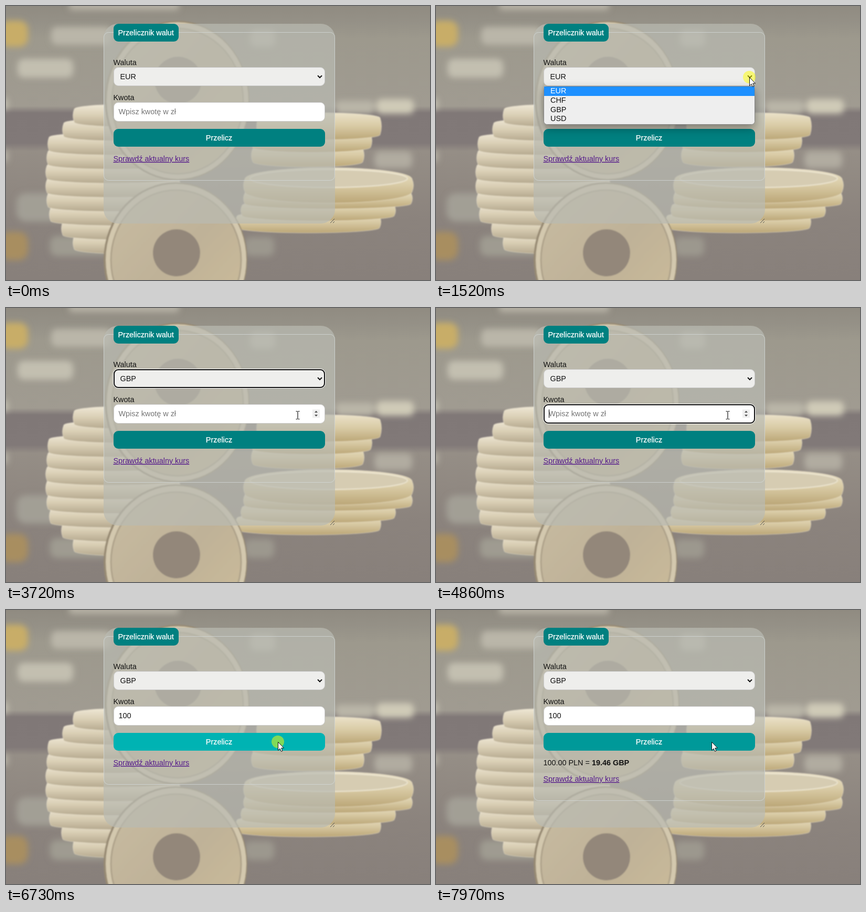
These frames come from a looping animation (808 by 524 pixels, 8 s). An HTML page:

```html
<!DOCTYPE html>
<html lang="pl">
<head>
<meta charset="utf-8">
<title>Przelicznik walut</title>
<style>
  html, body { margin: 0; width: 100%; height: 100%; overflow: hidden; background: #928d85; }
  svg { display: block; width: 808px; height: 524px; }
  text { font: 14.4px "Liberation Sans", Arial, sans-serif; fill: #111; white-space: pre; }
  .light { fill: #fff; stroke: #fff; stroke-width: .25; }
  .ring { fill: none; }
</style>
</head>
<body>
<svg viewBox="0 0 808 524" xmlns="http://www.w3.org/2000/svg">
  <defs>
    <linearGradient id="wall" x1="0" y1="0" x2="0" y2="1">
      <stop offset="0" stop-color="#908b81"/>
      <stop offset=".06" stop-color="#959187"/>
      <stop offset=".12" stop-color="#9d998d"/>
      <stop offset=".365" stop-color="#a09b91"/>
      <stop offset=".39" stop-color="#807877"/>
      <stop offset=".5" stop-color="#817978"/>
      <stop offset=".53" stop-color="#958e86"/>
      <stop offset=".78" stop-color="#8b837d"/>
      <stop offset="1" stop-color="#88807b"/>
    </linearGradient>
    <linearGradient id="cream" x1="0" y1="0" x2="0" y2="1">
      <stop offset="0" stop-color="#efe8d6"/>
      <stop offset=".5" stop-color="#d9ceb4"/>
      <stop offset="1" stop-color="#b5a98f"/>
    </linearGradient>
    <linearGradient id="gold" x1="0" y1="0" x2="0" y2="1">
      <stop offset="0" stop-color="#ebe2c9"/>
      <stop offset=".5" stop-color="#d8caa4"/>
      <stop offset="1" stop-color="#bba677"/>
    </linearGradient>
    <linearGradient id="face" x1="0" y1="0" x2="1" y2="1">
      <stop offset="0" stop-color="#c8bca2"/>
      <stop offset=".5" stop-color="#bfb298"/>
      <stop offset="1" stop-color="#cdbd9a"/>
    </linearGradient>
    <filter id="soft" x="-30%" y="-60%" width="160%" height="220%"><feGaussianBlur stdDeviation="6"/></filter>
    <filter id="edge"><feGaussianBlur stdDeviation="1.2"/></filter>
    <filter id="drop" x="-20%" y="-60%" width="140%" height="260%">
      <feDropShadow dx="0" dy="7" stdDeviation="9" flood-color="#000" flood-opacity=".35"/>
    </filter>
  </defs>

  <rect width="808" height="524" fill="url(#wall)"/>
  <g id="blobs" filter="url(#soft)"></g>
  <g id="coins" filter="url(#edge)"></g>

  <rect x="186" y="34" width="441" height="382" rx="27" fill="#babbb2" fill-opacity=".7"/>
  <path d="M618 415l8-8M623 415l3-3" stroke="#55524e" fill="none"/>
  <rect id="fieldset" x="186.5" y="50.5" width="440" height="283" rx="9" fill="none" stroke="#d5dada" stroke-opacity=".75"/>
  <rect x="205" y="34" width="124" height="34" rx="9" fill="#008080"/>
  <text class="light" x="213.5" y="56">Przelicznik walut</text>

  <text x="204.5" y="113">Waluta</text>
  <rect x="205.5" y="117.5" width="402" height="35" rx="8.5" fill="#eeeeec" stroke="#ccc"/>
  <text id="currency" x="217.5" y="140"></text>
  <path d="M594 133l4 4 4-4" fill="none" stroke="#111" stroke-width="2"/>
  <g id="selectRing" class="ring">
    <rect x="204.5" y="116.5" width="404" height="37" rx="9.5" stroke="#fff"/>
    <rect x="206" y="118" width="401" height="34" rx="8" stroke="#101010" stroke-width="2"/>
  </g>

  <text x="204.5" y="180">Kwota</text>
  <rect x="205.5" y="184.5" width="402" height="36" rx="8.5" fill="#fff" stroke="#ccc"/>
  <g id="inputRing" class="ring">
    <rect x="204.5" y="183.5" width="404" height="38" rx="9.5" stroke="#fff"/>
    <rect x="206" y="185" width="401" height="35" rx="8" stroke="#101010" stroke-width="2"/>
  </g>
  <text id="amount" x="214.5" y="207"></text>
  <path id="caret" stroke="#000"/>
  <g id="spinner">
    <rect x="584" y="194" width="14" height="16" fill="#efefef"/>
    <path d="M588 200l3-3.5 3 3.5zM588 204l3 3.5 3-3.5z" fill="#505050"/>
  </g>

  <rect id="button" x="205" y="235" width="403" height="34" rx="9"/>
  <text class="light" x="406" y="257" text-anchor="middle">Przelicz</text>
  <text id="result" x="204.5" y="297">100.00 PLN = <tspan font-weight="bold">19.46 GBP</tspan></text>
  <text id="link" x="204.5" y="297" style="fill:#551a8b" text-decoration="underline">Sprawdź aktualny kurs</text>

  <g id="list">
    <rect x="205.5" y="153.5" width="402" height="73" rx="6" fill="#eee" stroke="#858585" filter="url(#drop)"/>
    <rect id="mark" x="206" width="401" fill="#1e90ff"/>
    <g id="options"></g>
  </g>

  <g id="pointer">
    <circle id="press" r="12" fill="#ff0" fill-opacity=".5"/>
    <path id="arrow" d="M.5.5V16.5L4 13L6.5 18.5L9 17.3L6.7 12H11.5Z" fill="#fff" stroke="#111"/>
    <path id="beam" d="M-3.5-7.5h3M.5-7.5h3M0-7V7M-3.5 7.5h3M.5 7.5h3" fill="none" stroke="#111" stroke-width="1.2"/>
  </g>
</svg>
<script>
const LOOP = 8000;
const el = {};
document.querySelectorAll("svg [id]").forEach(node => el[node.id] = node);
const show = (node, on) => node.setAttribute("display", on ? "inline" : "none");
const within = (t, a, b) => t >= a && t < b;

// Backdrop: blurred patches as x, y, width, height, colour
const blob = ([x, y, w, h, fill]) =>
  `<rect x="${x}" y="${y}" width="${w}" height="${h}" rx="${Math.min(w, h) / 3}" fill="${fill}"/>`;
el.blobs.innerHTML = [
  [-12, 28, 54, 50, "#c8ad68"], [120, -12, 210, 20, "#b6b1a4"],
  [86, 40, 115, 34, "#bab6a9"], [465, 46, 48, 32, "#b9b5a8"],
  [22, 101, 106, 36, "#c3bfb0"], [-12, 176, 16, 22, "#c0bcae"],
  [-12, 276, 16, 22, "#b5b0a4"], [20, 358, 95, 54, "#a29f95"],
  [-12, 432, 54, 54, "#a88e61"], [84, 440, 112, 38, "#9f9b91"],
  [455, 442, 56, 36, "#9c988e"], [628, 181, 74, 25, "#b9b5a7"],
  [706, 178, 71, 28, "#cfcab7"], [702, 278, 72, 32, "#b1aca0"]
].map(blob).join("");

const disc = (left, right, y, h, paint, ry) => {
  const rx = (right - left) / 2;
  return `<path d="M${left} ${y}a${rx} ${ry} 0 0 1 ${2 * rx} 0q5 ${h / 2} 0 ${h}` +
    `a${rx} ${ry} 0 0 1 ${-2 * rx} 0q-5 ${-h / 2} 0 ${-h}z" fill="url(#${paint})" ` +
    `stroke="#f4ecd8" stroke-opacity=".5"/>`;
};
const bigCoin = (cx, cy, rx, ry, plainY) =>
  `<ellipse cx="${cx}" cy="${cy}" rx="${rx}" ry="${ry}" fill="#978a73"/>` +
  `<ellipse cx="${cx + 1}" cy="${cy}" rx="${rx - 3}" ry="${ry - 3}" fill="#d3c8ae"/>` +
  `<ellipse cx="${cx + 1}" cy="${cy + 1}" rx="${rx - 13}" ry="${ry - 14}" fill="url(#face)" stroke="#aea28a" stroke-width="3"/>` +
  `<circle cx="${cx + 2}" cy="${plainY}" r="45" fill="#93877a"/>`;

const leftEdges = [130, 110, 82, 80, 78, 78, 80, 85, 108, 130];
const leftStack = leftEdges.map((x, i) => disc(x, 330, 197 + i * 27, 25, "cream", 9));
const rightStack = [
  [480, 713, 214, 32], [470, 695, 246, 24], [470, 680, 273, 25],
  [455, 774, 331, 24], [455, 772, 358, 20], [450, 740, 381, 20], [440, 712, 402, 22]
].map(([a, b, y, h]) => disc(a, b, y, h, "gold", y === 331 ? 22 : 10));
el.coins.innerHTML = leftStack.reverse().join("") + rightStack.reverse().join("") +
  '<ellipse cx="615" cy="330" rx="150" ry="17" fill="#d6ccb2" stroke="#ece5d0" stroke-width="2"/>' +
  bigCoin(326, 181, 138, 153, 142) + bigCoin(323, 485, 137, 148, 472);

// Dropdown rows
const rowTop = i => Math.round(154 + 17.8 * i);
const rows = ["EUR", "CHF", "GBP", "USD"].map((name, i) => {
  const row = document.createElementNS("http://www.w3.org/2000/svg", "text");
  row.setAttribute("x", 218);
  row.setAttribute("y", rowTop(i) + 13);
  row.textContent = name;
  return el.options.appendChild(row);
});

// Pointer moves: start, end, steps, waypoints
const moves = [
  [130, 280, 6, [[750, 525], [609, 231]]],
  [480, 1010, 18, [[609, 231], [618, 160], [585, 86], [561, 102], [597, 136]]],
  [1720, 2150, 15, [[597, 136], [595, 186]]],
  [2600, 2720, 5, [[595, 186], [590, 198]]],
  [3470, 3720, 8, [[590, 198], [556, 205]]],
  [4890, 4890, 1, [[556, 205], [556, 206]]],
  [5120, 5420, 8, [[556, 206], [544, 219]]],
  [5920, 6370, 12, [[544, 219], [518, 252]]],
  [7540, 7970, 12, [[518, 252], [520, 293], [525, 252]]]
];
const presses = [[1210, 1540], [3150, 3290], [3790, 3890], [6670, 6830]];

// Catmull-Rom through the waypoints
function spline(points, f) {
  const last = points.length - 1;
  const i = Math.min(last - 1, Math.floor(f * last));
  const u = f * last - i;
  const at = k => points[Math.max(0, Math.min(last, k))];
  return [0, 1].map(d => {
    const [a, b, c, e] = [i - 1, i, i + 1, i + 2].map(k => at(k)[d]);
    return b + u / 2 * (c - a + u * (2 * a - 5 * b + 4 * c - e + u * (3 * (b - c) + e - a)));
  });
}

function pointerAt(t) {
  const move = moves.filter(m => t >= m[0]).pop();
  if (!move) return null;
  const [start, end, steps, points] = move;
  if (t >= end) return points[points.length - 1];
  const k = Math.floor((t - start) / (end - start) * (steps - 1));
  const f = (k + 1) / steps;
  return spline(points, f * f * (3 - 2 * f));
}

function draw(t) {
  const pos = pointerAt(t);
  const [x, y] = pos || [-99, -99];
  const open = within(t, 1240, 3220);
  const across = !open && x >= 205 && x < 608;
  const onInput = across && y >= 184 && y < 221;
  const onButton = across && y >= 235 && y < 269;
  const focused = within(t, 3790, 6670);
  const done = t >= 6830;

  show(el.pointer, pos);
  el.pointer.setAttribute("transform", `translate(${Math.round(x)} ${Math.round(y)})`);
  show(el.arrow, !onInput);
  show(el.beam, onInput);
  show(el.press, presses.some(([a, b]) => within(t, a, b)));

  show(el.list, open);
  const fade = Math.floor((t - 1240) / 40 + 1) / 7;
  el.list.setAttribute("opacity", Math.max(0, Math.min(1, fade)));
  const picked = t < 1720 ? 0 : Math.max(0, Math.min(2, Math.floor((y - 154) / 17.8)));
  el.mark.setAttribute("y", rowTop(picked));
  el.mark.setAttribute("height", rowTop(picked + 1) - rowTop(picked));
  rows.forEach((row, i) => row.style.fill = i === picked ? "#fff" : "#111");

  el.currency.textContent = t < 3220 ? "EUR" : "GBP";
  show(el.selectRing, within(t, 3220, 3790));
  show(el.inputRing, focused);
  show(el.spinner, onInput || focused);

  const typed = "100".slice(0, [4890, 5620, 5890].filter(at => t >= at).length);
  el.amount.textContent = typed || "Wpisz kwotę w zł";
  el.amount.style.fill = typed ? "#111" : "#757575";
  const blink = [[3790, 4320], [4860, 5420], [5620, 6370]];
  show(el.caret, blink.some(([a, b]) => within(t, a, b)));
  el.caret.setAttribute("d", `M${215.5 + 8 * typed.length} 194v16`);

  const active = within(t, 6670, 6830);
  el.button.setAttribute("fill", active ? "#00b3b3" : onButton ? "#009999" : "#008080");
  show(el.result, done);
  el.link.setAttribute("y", done ? 328 : 297);
  el.fieldset.setAttribute("height", done ? 314 : 283);
}

const begin = performance.now();
function tick() {
  draw((performance.now() - begin) % LOOP);
  requestAnimationFrame(tick);
}
tick();
</script>
</body>
</html>
```
